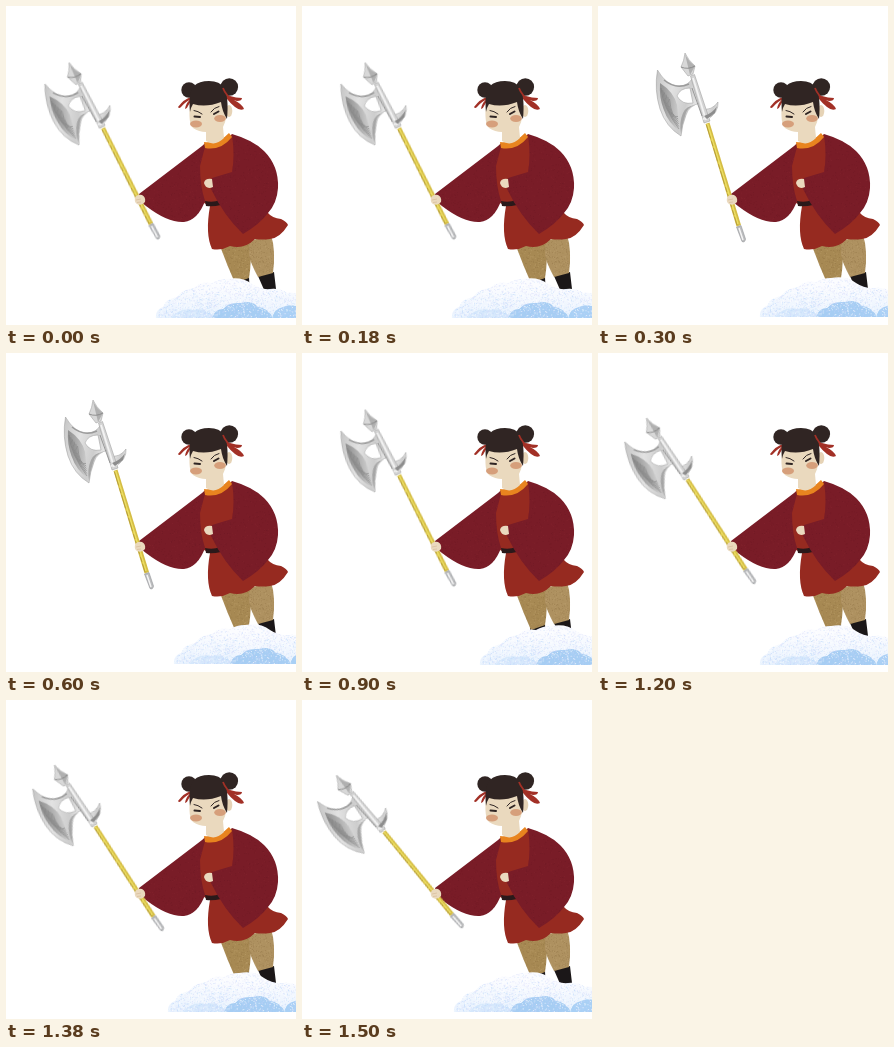
Animation of 290 by 319 pixels, one loop 1.8 s. Source, as an HTML page:

```html
<!DOCTYPE html>
<html lang="en">
<head>
<meta charset="utf-8">
<title>Axe bearer on a cloud</title>
<style>
  html, body { margin: 0; width: 100%; height: 100%; overflow: hidden; background: #fff; }
  svg { display: block; width: 290px; height: 319px; }
  #axe { transform-origin: 132px 194px; animation: swing 1.8s step-end infinite; }
  #cloud { animation: drift 1.8s step-end infinite; }
  @keyframes swing {
    0%, 50% { transform: rotate(-9.6deg); }
    16.6667% { transform: rotate(0deg); }
    66.6667% { transform: rotate(-15.9deg); }
    83.3333% { transform: rotate(-22.4deg); }
  }
  @keyframes drift {
    0% { transform: translate(0, 0); }
    16.6667% { transform: translate(12px, -1px); }
    33.3333% { transform: translate(18px, -1px); }
    50% { transform: translate(28px, 0); }
    66.6667% { transform: translate(12px, 0); }
    83.3333% { transform: translate(2px, 0); }
  }
</style>
</head>
<body>
<svg viewBox="0 0 290 319">
  <defs>
    <linearGradient id="steel" x1="0" y1="0" x2="1" y2=".4">
      <stop offset="0" stop-color="#c4c4c4"/>
      <stop offset=".4" stop-color="#e2e2e2"/>
      <stop offset=".75" stop-color="#cdcdcd"/>
      <stop offset="1" stop-color="#ececec"/>
    </linearGradient>
    <linearGradient id="belly" x1="0" y1="0" x2="1" y2="0">
      <stop offset="0" stop-color="#8f8f8f"/>
      <stop offset="1" stop-color="#d0d0d0"/>
    </linearGradient>
    <linearGradient id="mist" x1="0" y1="0" x2="0" y2="1">
      <stop offset=".2" stop-color="#fbfcff"/>
      <stop offset="1" stop-color="#e8f2fe"/>
    </linearGradient>
    <path id="legA" d="M214 240L244 234Q246 254 243 272L229 277Q221 259 214 240Z"/>
    <path id="legB" d="M243 235L265 229Q270 244 267 267L252 271Q245 258 243 250Z"/>
    <path id="robe" d="M199 137Q213 142 226 128L240 150L262 207Q266 212 275 213Q281 216 282 219Q274 232 264 233Q256 234 249 233Q238 244 224 240Q215 245 206 243Q199 228 204 200L194 195V143Z"/>
    <path id="sleeveA" d="M200 137L133 188Q134 196 140 200Q162 217 178 216Q192 214 199 195Q194 180 194 160Z"/>
    <path id="sleeveB" d="M226 128Q247 134 258 145Q273 160 272 182Q271 197 262 207Q254 218 237 228Q218 210 205 183L206 172L226 166Q229 150 226 128Z"/>
    <path id="puff" d="M150 312Q149 304 157 301Q160 293 171 291Q176 283 188 282Q196 275 206 277Q213 273 221 273Q236 270 246 278Q255 284 264 283Q274 282 281 287Q292 285 305 296V312Z"/>
    <path id="swirl" d="M206 312Q209 303 217 303Q222 296 235 297Q246 294 252 301Q262 302 267 312Z"/>
  </defs>

  <g id="figure">
    <path d="M228 275L243 271L244 292H230Z M252 270L268 266L270 283L259 286Z" fill="#1b1718"/>
    <use href="#legA" fill="#a78953"/>
    <use href="#legB" fill="#ae9160"/>
    <g id="legGrain"></g>
    <use href="#robe" fill="#962a20"/>
    <path d="M199 195Q207 197 214 194L215 199Q207 201 200 200Z" fill="#2a191a"/>
    <use href="#sleeveA" fill="#791c27"/>
    <use href="#sleeveB" fill="#791c27"/>
    <g id="robeGrain"></g>
    <path d="M198 136Q213 138 223 127L226 131Q215 145 199 142Z" fill="#e8841f"/>

    <ellipse cx="223" cy="105" rx="3.3" ry="6" fill="#e6d3b6"/>
    <path d="M184 98Q182 117 187 122Q193 126 200 126L200 135Q209 141 218 132L217 121Q222 112 221 92Q204 84 184 98Z" fill="#ead9be"/>
    <g fill="#d69f7b">
      <ellipse cx="190" cy="118" rx="6" ry="3.4"/>
      <ellipse cx="214" cy="112.500" rx="5.800" ry="3.500"/>
    </g>
    <g fill="none" stroke="#2e2423" stroke-linecap="round">
      <path d="M188 104.500Q192 105 196 108M205 106Q208 101.500 213 100.500" stroke-width="1"/>
      <path d="M188.500 110.500L194 111M208 108L212.500 105.500" stroke-width="2"/>
    </g>
    <g fill="#a23026">
      <path d="M185 91Q178 93 172 101Q173 103 175 101Q180 95 186 93Z"/>
      <path d="M186 92Q180 96 179 103Q181 103 182 100Q184 96 187 94Z"/>
      <path d="M224 90Q230 92 236 92Q236 95 231 95Q226 94 222 91Z"/>
      <path d="M217 81Q220 89 228 94Q236 98 238 103Q234 105 229 101Q219 93 216 83Z"/>
    </g>
    <g fill="#302523">
      <circle cx="183" cy="84" r="7.700"/>
      <circle cx="223.300" cy="81" r="8.800"/>
      <path d="M184 106Q182 87 188 80Q193 75 203 75Q214 75 218 82Q223 91 221 113Q216 105 215 96Q200 102 187 98Q185 101 184 106Z"/>
    </g>
    <path d="M217 82Q220 90 228 95" fill="none" stroke="#a23026" stroke-width="1.800"/>
    <path d="M198 177Q199 172 206 173L207 181Q200 184 198 177Z" fill="#ead9be"/>
  </g>

  <g id="axe">
    <path d="M107.500 118L111.500 116.500L143 219L138.500 220.500Z" fill="#d5bd45"/>
    <path d="M109.500 118L140 218" stroke="#eddf62" stroke-width="1.500"/>
    <path d="M108.500 119L139 219" stroke="#a99138" stroke-width=".7" stroke-dasharray="14 3 5 2"/>
    <path d="M138.500 221L143 219.500L147.500 233Q147 237 144 235.500Z" fill="#bcbdbf" stroke="#85868a" stroke-width=".5"/>
    <path d="M141 222L145 234" stroke="#f5f5f5" stroke-width="1.500"/>
    <g stroke="#999" stroke-width=".5" stroke-linejoin="round">
      <path fill-rule="evenodd" fill="url(#steel)" d="M59.500 64Q68 79 80 80Q91 80 95 71L103 97Q91 99 88 109Q84 119 83 130Q68 121 62 103Q56 84 59.500 64ZM79 90Q82 82 92 82L95 97Q84 99 79 90Z"/>
      <path fill="url(#steel)" d="M103 103Q114 105 120 96Q121 106 109 114Z"/>
      <path fill="#d4d4d4" d="M92.500 70L96.500 68.500L112 115L106 117Z"/>
      <path fill="#d8d8d8" d="M87 47Q90 54 97 60L95 68L90 70L83 61Q86 55 87 47Z"/>
    </g>
    <path d="M62 77Q76 86 79 99Q80 112 82 125Q70 117 65.500 103Q61 91 62 77Z" fill="url(#belly)"/>
    <path d="M97 99Q89 101 87 110Q84 119 83 128Q81 116 85 107Q88 100 97 99Z" fill="#a6a6a6"/>
    <path d="M66 74Q78 84 91 78" fill="none" stroke="#9b9b9b" stroke-width="1.500"/>
    <path d="M87 48L92 69L97 60Q90 55 87 48Z" fill="#b0b0b0"/>
    <path d="M83 61Q90 64 97 60" fill="none" stroke="#808080" stroke-width=".8"/>
    <path d="M95 72L108 114" stroke="#f3f3f3" stroke-width="1.800"/>
    <path d="M94 82L104 110" stroke="#8f8f8f" stroke-width=".9"/>
    <path d="M105 113L112 111" stroke="#eee" stroke-width="2"/>
    <path d="M106 110Q115 107 119 100L117 107L109 113Z" fill="#8d8d8d"/>
    <g id="hatch" fill="none" stroke="#777" stroke-width=".5"></g>
  </g>
  <path d="M129 192Q131 188 136 189Q140 191 139 196Q136 200 131 198Q128 196 129 192Z" fill="#ead9be"/>
  <path d="M130 194L135 193M131 196.500L135 196" stroke="#d4b794" stroke-width=".6"/>

  <g id="cloud">
    <use href="#puff" fill="url(#mist)"/>
    <path d="M165 312Q174 301 188 304Q201 301 209 312Z" fill="#d6e8fc"/>
    <use href="#swirl" fill="#a6cdf3"/>
    <path d="M266 312Q268 303 277 301Q288 296 303 306V312Z" fill="#a9d0f5"/>
    <g id="cloudGrain"></g>
  </g>
</svg>
<script>
  const NS = 'http://www.w3.org/2000/svg';
  let seed = 7;
  const rand = () => (seed = seed * 16807 % 2147483647) / 2147483647;
  const byId = id => document.getElementById(id);

  function add(parent, tag, attrs) {
    const node = document.createElementNS(NS, tag);
    for (const key in attrs) node.setAttribute(key, attrs[key]);
    return parent.appendChild(node);
  }

  // Scatter small squares inside a shape; bias > 1 crowds them towards the top.
  function grain(target, shape, count, fill, opacity, size, bias = 1) {
    const clip = 'in-' + shape;
    if (!byId(clip)) {
      add(add(document.querySelector('defs'), 'clipPath', { id: clip }), 'use', { href: '#' + shape });
    }
    const box = byId(shape).getBBox();
    let d = '';
    for (let i = 0; i < count; i++) {
      const x = box.x + rand() * box.width;
      const y = box.y + rand() ** bias * box.height;
      d += `M${x.toFixed(1)} ${y.toFixed(1)}h${size}v${size}h${-size}z`;
    }
    add(byId(target), 'path', { d, fill, opacity, 'clip-path': `url(#${clip})` });
  }

  for (const leg of ['legA', 'legB']) {
    grain('legGrain', leg, 180, '#84683a', .4, .8);
    grain('legGrain', leg, 120, '#c8ad7c', .4, .8);
  }
  for (const sleeve of ['sleeveA', 'sleeveB']) {
    grain('robeGrain', sleeve, 350, '#5e1520', .3, .8);
    grain('robeGrain', sleeve, 250, '#96303a', .25, .8);
  }
  grain('cloudGrain', 'puff', 900, '#cfd2f8', .45, 1, 1.2);
  grain('cloudGrain', 'puff', 500, '#b3d4f9', .5, 1, .6);
  grain('cloudGrain', 'puff', 700, '#fff', .6, 1);

  // Engraved lines following the cutting edge.
  for (let i = 0; i < 6; i++) {
    const x = 63 + i * 1.7, y = 82 + i * 2.2;
    add(byId('hatch'), 'path', { d: `M${x} ${y}Q${x + 2} ${y + 20} ${81 - i * .2} ${123 - i * 2.5}` });
  }
</script>
</body>
</html>
```
